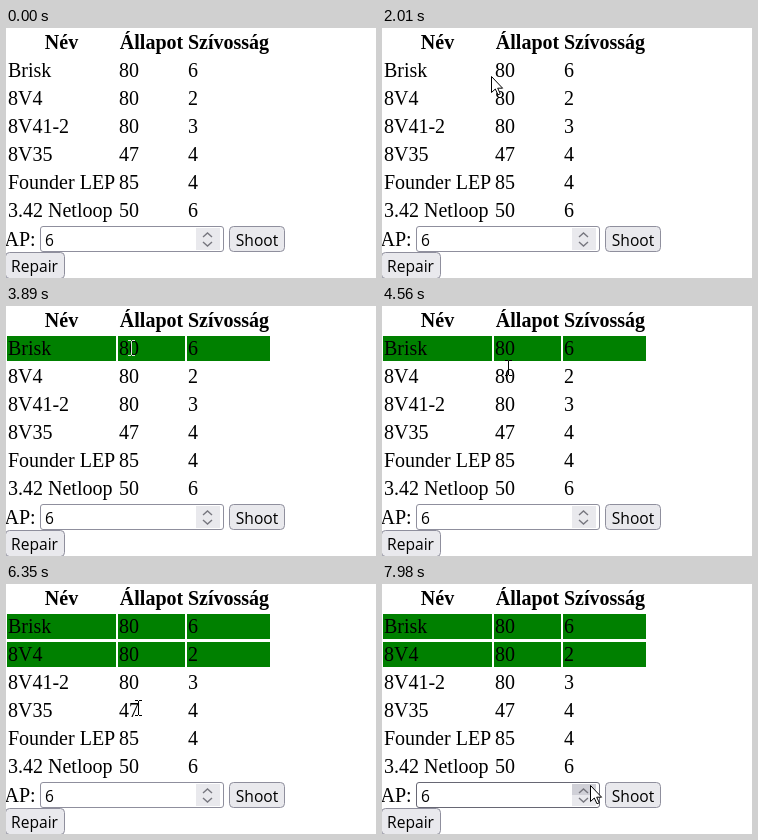
Write an HTML page that moves like this. It is 370 px wide and 250 px high and loops after 8 s.

```html
<!DOCTYPE html>
<html lang="hu">
<head>
<meta charset="utf-8">
<style>
html, body { margin: 0; width: 100%; height: 100%; overflow: hidden; background: #fff; }
svg { display: block; }
text { font: 20px "Liberation Serif", "Times New Roman", serif; }
.head { font-weight: bold; }
.ui { font: 15.6px "Open Sans", "Noto Sans", sans-serif; }
.button { text-anchor: middle; }
.box { stroke: #8f8f9d; fill: #e9e9ed; }
.box.hover { stroke: #676774; fill: #d0d0d7; }
.field, .field.hover { fill: #fff; }
.spin { fill: #e9e9ed; }
.spin.hover { fill: #d0d0d7; }
.chevron { fill: none; stroke: #77777f; stroke-width: 1.4; }
</style>
</head>
<body>
<svg width="370" height="250" viewBox="0 0 370 250">
  <g id="table"></g>
  <text x="-1.5" y="218">AP:</text>
  <rect class="box field" x="34.5" y="198.5" width="183" height="25" rx="2.5"/>
  <text class="ui" x="39" y="218">6</text>
  <rect class="spin" x="190" y="200" width="24" height="11"/>
  <rect class="spin" x="190" y="211" width="24" height="11"/>
  <path class="chevron" d="M197 209l4.5-4 4.5 4M197 214l4.5 4 4.5-4"/>
  <rect class="box" x="223.5" y="198.5" width="55" height="25" rx="4"/>
  <text class="ui button" x="251" y="218">Shoot</text>
  <rect class="box" x="-.5" y="224.5" width="59" height="26" rx="4"/>
  <text class="ui button" x="28.5" y="244">Repair</text>
  <path id="arrow" fill="#fff" stroke="#000" d="M.5 .5V16.5L4.3 13L7 18.8L9.3 17.8L6.7 12.2H11.6Z"/>
  <path id="beam" fill="none" shape-rendering="crispEdges"
    d="M-3-7.5H0M1-7.5H4M.5-7V7M-3 7.5H0M1 7.5H4"/>
</svg>
<script>
const LOOP = 8000, STEP = 50, ROW = 28;
const columns = [
  { title: "Név", x: 1, width: 109, cells: ["Brisk", "8V4", "8V41-2", "8V35", "Founder LEP", "3.42 Netloop"] },
  { title: "Állapot", x: 112, width: 67, cells: [80, 80, 80, 47, 85, 50] },
  { title: "Szívosság", x: 181, width: 83, cells: [6, 2, 3, 4, 4, 6] }
];

// Each move leads from the previous resting point to x, y.
const ENTRY = [272, 250];
const moves = [
  { from: 240, to: 630, x: 211, y: 191 },
  { from: 890, to: 1760, x: 109, y: 60 },
  { from: 1910, to: 2360, x: 109, y: 4 },
  { from: 2620, to: 2720, x: 119, y: 10 },
  { from: 2870, to: 3170, x: 121, y: 41 },
  { from: 3320, to: 3540, x: 124, y: 33 },
  { from: 3790, to: 3890, x: 125, y: 42, hit: 0 },
  { from: 3940, to: 4560, x: 126, y: 62 },
  { from: 4860, to: 4960, x: 127, y: 70, hit: 1 },
  { from: 5180, to: 5980, x: 130, y: 107 },
  { from: 6050, to: 6350, x: 132, y: 124 },
  { from: 7160, to: 7880, x: 208, y: 201 }
];

const $ = id => document.getElementById(id);
const show = (node, on) => node.setAttribute("visibility", on ? "visible" : "hidden");
const add = (tag, attrs, text = "") => {
  const node = document.createElementNS("http://www.w3.org/2000/svg", tag);
  for (const key in attrs) node.setAttribute(key, attrs[key]);
  node.textContent = text;
  return $("table").appendChild(node);
};

const hits = moves.filter(move => "hit" in move).map(move => ({
  time: move.from,
  cells: columns.map(({ x, width }) =>
    add("rect", { x, y: 30 + ROW * move.hit, width, height: 25, fill: "#008000" }))
}));

for (const { title, x, width, cells } of columns) {
  add("text", { class: "head", x: x + width / 2, y: 21, "text-anchor": "middle" }, title);
  cells.forEach((value, row) => add("text", { x: x + 1, y: 49 + ROW * row }, value));
}

const inside = ([px, py], node) => {
  const { x, y, width, height } = node.getBBox();
  return px >= x && px < x + width && py >= y && py < y + height;
};

function pointerAt(time) {
  const i = moves.findLastIndex(move => move.from <= time);
  if (i < 0) return null;
  const { from, to, x, y } = moves[i];
  const [x0, y0] = i ? [moves[i - 1].x, moves[i - 1].y] : ENTRY;
  const frame = t => Math.floor((t - from) / STEP) + 1;
  const k = Math.min(1, frame(time) / frame(to));
  const eased = k * k * (3 - 2 * k);
  return [x0 + (x - x0) * eased, y0 + (y - y0) * eased].map(Math.round);
}

const texts = [...document.querySelectorAll("#table text")];
const controls = document.querySelectorAll(".box, .spin");

function render(time) {
  const pointer = pointerAt(time), p = pointer || [-99, -99];
  for (const { time: start, cells } of hits) cells.forEach(cell => show(cell, time >= start));
  for (const control of controls) control.classList.toggle("hover", inside(p, control));

  const overField = inside(p, document.querySelector(".field")) && p[0] < 190;
  const beam = overField || texts.some(text => inside(p, text));
  const onGreen = hits.some(hit => time >= hit.time && hit.cells.some(cell => inside(p, cell)));
  show($("arrow"), pointer && !beam);
  show($("beam"), pointer && beam);
  $("beam").setAttribute("stroke", onGreen ? "#ddd" : "#000");
  for (const id of ["arrow", "beam"]) $(id).setAttribute("transform", `translate(${p})`);
}

const begin = performance.now();
function tick() {
  render((performance.now() - begin) % LOOP);
  requestAnimationFrame(tick);
}
tick();
</script>
</body>
</html>
```
